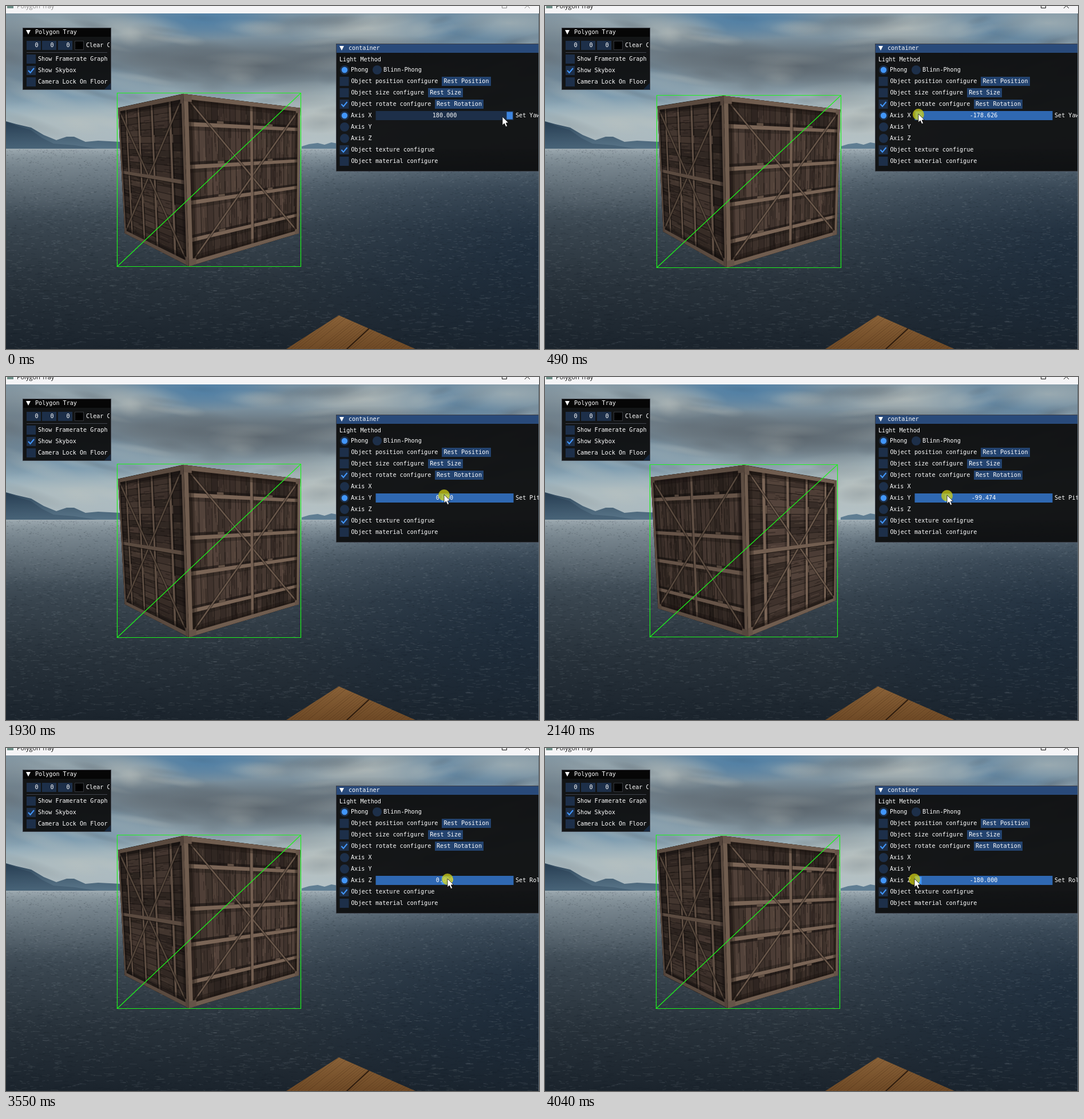
Animation, 932 px wide and 601 px high, one loop 4.11 s. Source, as an HTML page with a canvas:

```html
<!DOCTYPE html>
<html lang="en">
<head>
<meta charset="utf-8">
<title>Polygon Tray</title>
<style>
html, body { margin: 0; width: 100%; height: 100%; overflow: hidden; background: #18222d; }
canvas { display: block; }
</style>
</head>
<body>
<canvas id="stage" width="932" height="601"></canvas>
<script>
const LOOP = 4110, TICK = 68.5;
const stage = document.getElementById('stage');
let ctx = stage.getContext('2d');

const clamp = (v, lo, hi) => Math.min(hi, Math.max(lo, v));
function seeded(seed) {
  return () => (seed = (seed * 16807) % 2147483647) / 2147483647;
}
function rect(x, y, w, h, color) {
  ctx.fillStyle = color;
  ctx.fillRect(x, y, w, h);
}
function path(points, close) {
  ctx.beginPath();
  points.forEach(p => ctx.lineTo(p[0], p[1]));
  if (close) ctx.closePath();
}
function poly(points, color) {
  path(points, true);
  ctx.fillStyle = color;
  ctx.fill();
}
function line(points, color, width) {
  path(points);
  ctx.strokeStyle = color;
  ctx.lineWidth = width;
  ctx.stroke();
}
function disc(x, y, r, color) {
  ctx.beginPath();
  ctx.arc(x, y, r, 0, 7);
  ctx.fillStyle = color;
  ctx.fill();
}
function text(s, x, y, align = 'left') {
  ctx.font = '10.1px "DejaVu Sans Mono", monospace';
  ctx.textAlign = align;
  ctx.textBaseline = 'middle';
  ctx.fillStyle = '#fff';
  ctx.fillText(s, x, y + 0.5);
}
function vertical(y0, y1, stops) {
  const g = ctx.createLinearGradient(0, y0, 0, y1);
  stops.forEach(([at, color]) => g.addColorStop(at, color));
  return g;
}

// ---------- Sea and sky, painted once ----------
function blob(x, y, rx, ry, rgb, alpha, tilt = 0) {
  ctx.save();
  ctx.translate(x, y);
  ctx.rotate(tilt);
  ctx.scale(rx, ry);
  const g = ctx.createRadialGradient(0, 0, 0, 0, 0, 1);
  g.addColorStop(0, `rgba(${rgb},${alpha})`);
  g.addColorStop(0.5, `rgba(${rgb},${alpha * 0.6})`);
  g.addColorStop(1, `rgba(${rgb},0)`);
  ctx.fillStyle = g;
  ctx.fillRect(-1, -1, 2, 2);
  ctx.restore();
}
function paintScene() {
  const rnd = seeded(71);
  const cream = '198,200,192', grey = '88,98,106', blue = '72,124,166';
  rect(0, 0, 932, 252, vertical(13, 250, [
    [0, '#7690a2'], [0.35, '#7f8f99'], [0.7, '#98b0bc'], [1, '#b6c3c8']]));
  blob(345, 22, 150, 40, blue, 0.85);
  blob(800, 45, 180, 40, blue, 0.5);
  blob(90, 135, 190, 60, blue, 0.4);
  blob(90, 30, 200, 40, cream, 0.35);
  blob(230, 45, 90, 30, cream, 0.5);
  blob(640, 40, 150, 40, cream, 0.6);
  blob(880, 30, 120, 30, cream, 0.5);
  blob(440, 105, 260, 50, grey, 0.9);
  blob(250, 85, 170, 38, grey, 0.55);
  blob(640, 80, 180, 30, grey, 0.5);
  blob(10, 90, 80, 90, grey, 0.4);
  blob(550, 190, 170, 60, cream, 0.65);
  blob(120, 200, 170, 40, cream, 0.4);
  for (let i = 0; i < 110; i++) {
    const x = rnd() * 932, y = 20 + rnd() * 200;
    blob(x, y, 20 + rnd() * 60, 6 + rnd() * 14, rnd() < 0.5 ? cream : grey,
      0.1 + rnd() * 0.16, (x - 466) / 466 * -0.35);
  }

  poly([[517, 246], [530, 242], [545, 240], [557, 243], [569, 239], [580, 241], [580, 252], [517, 252]], '#5f7d92');
  poly([[0, 253], [0, 202], [18, 207], [44, 213], [66, 226], [88, 235], [106, 229], [119, 229],
    [139, 238], [161, 236], [200, 238], [200, 253]], vertical(202, 253, [[0, '#31495d'], [1, '#4b6c84']]));
  poly([[0, 253], [0, 203], [22, 211], [43, 217], [63, 231], [83, 241], [120, 244], [160, 250]],
    vertical(203, 253, [[0, '#2a4054'], [1, '#36566f']]));

  rect(0, 250, 932, 351, vertical(250, 601, [
    [0, '#a3b0b7'], [0.04, '#83929b'], [0.1, '#687782'], [0.2, '#505e69'], [0.4, '#39454f'],
    [0.68, '#28323b'], [1, '#1b242d']]));
  blob(90, 285, 330, 80, '142,153,158', 0.35);
  blob(932, 420, 480, 240, '16,34,54', 0.55);
  for (let i = 0; i < 8500; i++) {
    const depth = rnd() ** 1.5, y = 252 + depth * 349, x = rnd() * 932;
    const w = 2 + depth * 13 * rnd(), shine = rnd() < 0.5;
    ctx.globalAlpha = (shine ? 0.2 : 0.24) * (1 - depth * 0.55);
    line([[x, y], [x + w, y + (rnd() - 0.5) * (1 + depth * 3)]], shine ? '#a2acb2' : '#141c24', 0.7 + depth * 0.8);
  }
  ctx.globalAlpha = 1;

  const dock = [[490, 601], [582, 542], [716, 601]];
  poly(dock, vertical(542, 601, [[0, '#8a6238'], [1, '#6f4a26']]));
  ctx.save();
  path(dock, true);
  ctx.clip();
  for (let i = 0; i < 45; i++) {
    const x = 480 + i * 6;
    line([[x + 75, 540], [x, 601]], `rgba(40,18,5,${rnd() * 0.3})`, 1);
  }
  line([[636, 564], [595, 602]], '#2d1b0d', 2);
  ctx.restore();
}
function prerender(paint) {
  const layer = document.createElement('canvas'), main = ctx;
  layer.width = 932;
  layer.height = 601;
  ctx = layer.getContext('2d');
  paint();
  ctx = main;
  return layer;
}
const scene = prerender(paintScene);

// ---------- Crate ----------
const CENTER = [-0.502, -0.0682, 2.5453];
const AXES = [[0.7071, -0.0803, 0.7025], [0, -0.9935, -0.1136], [0.7071, 0.0803, -0.7025]];
const BEAMS = [0.155, 0.38, 0.59, 0.835];

function turn(p, axis, degrees) {
  const i = (axis + 1) % 3, j = (axis + 2) % 3, a = degrees * Math.PI / 180;
  const q = [...p];
  q[i] = p[i] * Math.cos(a) - p[j] * Math.sin(a);
  q[j] = p[i] * Math.sin(a) + p[j] * Math.cos(a);
  return q;
}
const rotate = (p, angles) => [2, 1, 0].reduce((q, k) => turn(q, k, angles[k]), p);
const toCamera = p => CENTER.map((c, k) => c + p[0] * AXES[0][k] + p[1] * AXES[1][k] + p[2] * AXES[2][k]);
const project = ([x, y, z]) => [468 + 560 * x / z, 306 + 560 * y / z];

function drawFace(axis, side, angles) {
  const normal = [0, 0, 0];
  normal[axis] = side / 2;
  const world = rotate(normal, angles), mid = toCamera(world);
  if (mid.reduce((sum, m, k) => sum + m * (m - CENTER[k]), 0) >= 0) return;

  const light = 0.8 + 0.4 * Math.max(0, world[2]);
  const tone = (r, g, b, a = 1) => `rgba(${r * light},${g * light},${b * light},${a})`;
  const uAxis = axis ? 0 : 1, vAxis = axis === 1 ? 2 : 3 - axis - uAxis;
  const at = (u, v) => {
    const p = [...normal];
    p[uAxis] = u - 0.5;
    p[vAxis] = 0.5 - v;
    return project(toCamera(rotate(p, angles)));
  };
  const board = (u0, v0, u1, v1, color) => poly([at(u0, v0), at(u1, v0), at(u1, v1), at(u0, v1)], color);
  const rnd = seeded(977 + axis * 31);

  board(0, 0, 1, 1, tone(60, 48, 42));
  for (let i = 0; i < 22; i++) {
    for (let row = 0; row < 5; row++) {
      const top = row ? BEAMS[row - 1] : 0, bottom = BEAMS[row] || 1;
      const shade = (0.72 + rnd() * 0.4) * (row % 4 ? 1.08 : 0.85);
      board(i / 22, top, (i + 1) / 22, bottom, tone(70 * shade, 56 * shade, 49 * shade));
    }
    line([at(i / 22, 0), at(i / 22, 1)], tone(26, 20, 18, 0.65), 1);
  }
  for (let i = 0; i < 260; i++) {
    const u = rnd(), v = rnd() * 0.9;
    line([at(u, v), at(u, v + 0.03 + rnd() * 0.08)],
      rnd() < 0.55 ? tone(24, 18, 16, 0.4) : tone(135, 112, 96, 0.24), 0.8 + rnd());
  }
  for (const v of BEAMS) {
    board(0, v - 0.035, 1, v - 0.012, tone(22, 17, 15, 0.3));
    board(0, v + 0.012, 1, v + 0.03, tone(22, 17, 15, 0.6));
    board(0, v - 0.012, 1, v + 0.012, tone(122, 101, 86));
    for (const u of [0.22, 0.65]) board(u, v + 0.009, u + 0.05, v + 0.027, tone(96, 79, 67));
  }
  for (const [v0, v1] of [[0.02, 0.98], [0.98, 0.02]]) {
    line([at(0.02, v0), at(0.98, v1)], tone(26, 20, 17, 0.6), 4.5);
    line([at(0.02, v0), at(0.98, v1)], tone(104, 86, 73), 2.6);
  }
  board(0.488, 0, 0.512, 1, tone(114, 94, 80));
  line([at(0.515, 0), at(0.515, 1)], tone(26, 20, 17, 0.7), 1);
  const edge = 0.027, rim = tone(112, 93, 79);
  for (const inset of [0.06, 0.042]) {
    board(0, 0, 1, inset, tone(20, 15, 13, 0.3));
    board(0, 1 - inset, 1, 1, tone(20, 15, 13, 0.3));
    board(0, 0, inset, 1, tone(20, 15, 13, 0.3));
    board(1 - inset, 0, 1, 1, tone(20, 15, 13, 0.3));
  }
  board(0, 0, 1, edge, rim);
  board(0, 1 - edge, 1, 1, rim);
  board(0, 0, edge, 1, rim);
  board(1 - edge, 0, 1, 1, rim);
  for (const u of [0, 0.95]) for (const v of [0, 0.96]) board(u, v, u + 0.05, v + 0.04, tone(102, 84, 72));
}
function drawCrate(angles) {
  for (let axis = 0; axis < 3; axis++) for (const side of [-1, 1]) drawFace(axis, side, angles);

  const corners = [];
  for (let i = 0; i < 8; i++) {
    const p = [i & 1, i >> 1 & 1, i >> 2].map(b => b - 0.5);
    corners.push(project(toCamera(rotate(p, angles))));
  }
  const xs = corners.map(c => c[0]), ys = corners.map(c => c[1]);
  const l = Math.round(Math.min(...xs)) - 1.5, r = Math.round(Math.max(...xs)) + 1.5;
  const t = Math.round(Math.min(...ys)) - 1.5, b = Math.round(Math.max(...ys)) + 0.5;
  line([[l, b], [l, t], [r, t], [r, b], [l, b], [r, t]], '#1cf51c', 1.2);
}

// ---------- Pointer and sliders, in ticks ----------
const MOVES = [[0, 868, 194], [1, 876, 190], [7, 652.87, 189], [8, 648, 189], [10, 648, 189],
  [12, 597, 208], [13, 597, 208], [15, 641, 208], [17, 668, 205], [20, 668, 205], [27, 766, 206],
  [28, 766, 206], [34, 640, 208], [36, 640, 208], [39, 597, 229], [40, 597, 229], [43, 651, 229],
  [44, 651, 229], [51, 772, 229], [52, 772, 229], [59, 646, 229]];
const SLIDERS = [
  { name: 'Axis X', label: 'Set Yaw', y: 192, press: 1, release: 10, grabX: 880, start: 180 },
  { name: 'Axis Y', label: 'Set Pitch', y: 212, press: 28, release: 37, grabX: 766, start: 0 },
  { name: 'Axis Z', label: 'Set Roll', y: 232, press: 52, release: 60, grabX: 772, start: 0 }];
const HALOS = [[1, 9], [12, 13], [28, 35], [39, 40], [52, 60]];

function pointer(tick) {
  const i = MOVES.findIndex(m => m[0] >= tick);
  if (i < 1) return MOVES[0].slice(1);
  const [t0, x0, y0] = MOVES[i - 1], [t1, x1, y1] = MOVES[i], k = (tick - t0) / (t1 - t0);
  return [x0 + (x1 - x0) * k, y0 + (y1 - y0) * k];
}
function sliderValue(s, tick) {
  if (tick < s.press) return s.start;
  const x = pointer(Math.min(tick, s.release - 1))[0];
  return clamp(s.start + (x - s.grabX) * 360 / 228, -180, 180);
}
function drawPointer(tick) {
  const [x, y] = pointer(tick);
  if (HALOS.some(([a, b]) => tick >= a && tick <= b)) disc(x, y + 1, 10, 'rgba(205,205,20,0.75)');
  const arrow = [[0, 0], [0, 15], [3.4, 11.8], [6, 17.5], [8.6, 16.4], [6.2, 11], [10.6, 10.6]]
    .map(p => [x + p[0], y + p[1]]);
  poly(arrow, '#fff');
  line([...arrow, arrow[0]], '#111', 0.8);
}

// ---------- Panels ----------
const FRAME = '#1d2f49', HOVER = '#23456f', ACTIVE = '#2f68b2', ACCENT = '#4296fa';

function panel(x, y, w, h, title, titleColor) {
  rect(x, y, w, h, 'rgba(13,14,15,0.95)');
  rect(x, y, w, 16, titleColor);
  ctx.strokeStyle = '#3b3e47';
  ctx.lineWidth = 1;
  ctx.strokeRect(x + 0.5, y + 0.5, w - 1, h - 1);
  poly([[x + 6, y + 4], [x + 14, y + 4], [x + 10, y + 12]], '#fff');
  text(title, x + 22, y + 8);
}
function checkbox(x, y, label, on) {
  rect(x, y - 8, 16, 16, FRAME);
  if (on) line([[x + 3, y], [x + 6.5, y + 4], [x + 13, y - 4]], ACCENT, 2);
  text(label, x + 20, y);
}
function radio(x, y, label, on) {
  disc(x, y, 8, FRAME);
  if (on) disc(x, y, 5.2, ACCENT);
  text(label, x + 11, y);
}
function button(x, y, w, label) {
  rect(x, y - 8, w, 16, '#23436f');
  text(label, x + w / 2, y, 'center');
}
function clipped(x, y, w, h, draw) {
  ctx.save();
  ctx.beginPath();
  ctx.rect(x, y, w, h);
  ctx.clip();
  draw();
  ctx.restore();
}
function drawSettings() {
  panel(29, 38, 155, 109, 'Polygon Tray', '#060606');
  for (const x of [36, 63, 91]) {
    rect(x, 61, 25, 16, FRAME);
    text('0', x + 17.5, 69, 'center');
  }
  rect(120, 61, 16, 16, '#33363b');
  rect(121, 62, 14, 14, '#000');
  clipped(29, 38, 152, 109, () => text('Clear Color', 140, 69));
  rect(36, 81, 141, 1, '#40434c');
  checkbox(36, 93, 'Show Framerate Graph', false);
  checkbox(36, 113, 'Show Skybox', true);
  checkbox(36, 133, 'Camera Lock On Floor', false);
  poly([[183, 135], [183, 146], [172, 146]], '#16283f');
}
function drawContainer(tick, angles) {
  const axis = tick < 13 ? 0 : tick < 40 ? 1 : 2;
  panel(577, 66, 400, 224, 'container', '#294a7a');
  text('Light Method', 583, 94);
  radio(592, 112, 'Phong', true);
  radio(649, 112, 'Blinn-Phong', false);
  checkbox(583.5, 132, 'Object position configure', false);
  button(762, 132, 86, 'Rest Position');
  checkbox(583.5, 152, 'Object size configure', false);
  button(738, 152, 61, 'Rest Size');
  checkbox(583.5, 172, 'Object rotate configure', true);
  button(750, 172, 85, 'Rest Rotation');
  SLIDERS.forEach((s, i) => radio(592, s.y, s.name, i === axis));
  checkbox(583.5, 252, 'Object texture configrue', true);
  checkbox(583.5, 272, 'Object material configure', false);

  const s = SLIDERS[axis], value = angles[axis], [mx, my] = pointer(tick);
  const held = tick >= s.press && tick < s.release;
  const hover = tick > 0 && mx > 647 && mx < 887 && Math.abs(my - s.y) < 8;
  rect(646.5, s.y - 8, 241, 16, held ? ACTIVE : hover ? HOVER : FRAME);
  rect(648 + (value + 180) / 360 * 227.5, s.y - 6.5, 10.5, 13, held ? ACCENT : '#3d85e0');
  text(value.toFixed(3), 767, s.y, 'center');
  text(s.label, 891, s.y);
}
function drawTitleBar(focused) {
  const ink = focused ? '#111' : '#8b8b8b';
  rect(0, 0, 932, 13, '#f4f4f6');
  rect(2, 0, 11, 4, '#6e8f88');
  ctx.font = '11px "Open Sans", sans-serif';
  ctx.textAlign = 'left';
  ctx.textBaseline = 'alphabetic';
  ctx.fillStyle = ink;
  ctx.fillText('Polygon Tray', 19, 4);
  line([[867.5, -2], [867.5, 3.5], [875.5, 3.5], [875.5, -2]], ink, 1);
  line([[907, 4], [911.5, -0.5], [916, 4]], ink, 1);
}

function frame(now) {
  const tick = Math.min(59, Math.floor((now % LOOP + 15) / TICK));
  const angles = SLIDERS.map(s => sliderValue(s, tick));
  ctx.drawImage(scene, 0, 0);
  drawCrate(angles);
  drawSettings();
  drawContainer(tick, angles);
  drawTitleBar(tick > 0);
  drawPointer(tick);
  rect(931, 13, 1, 588, '#5d6a74');
  requestAnimationFrame(frame);
}
requestAnimationFrame(frame);
</script>
</body>
</html>
```
